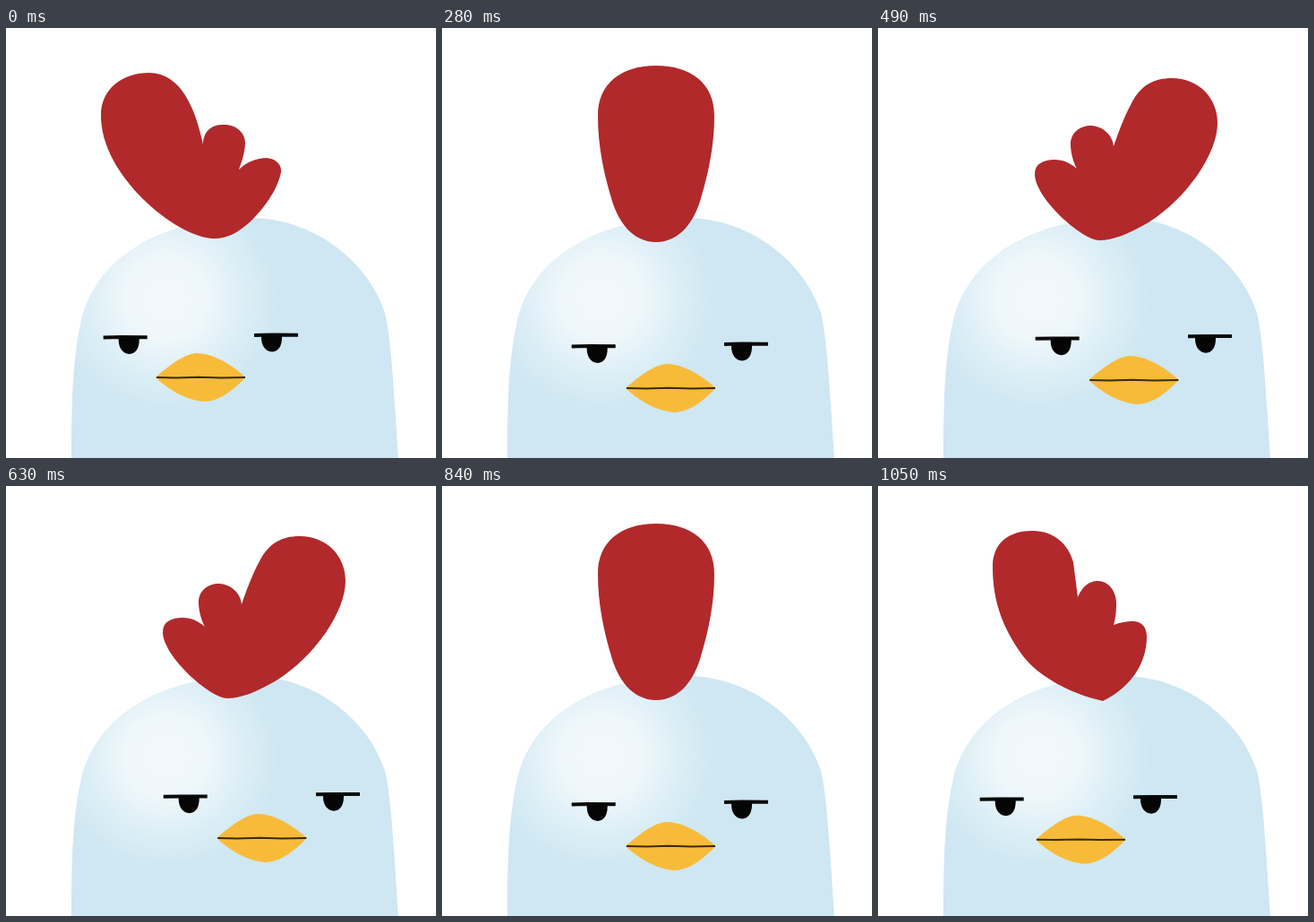
Write an HTML page that moves like this. It is 480 by 480 pixels and loops after 1120 ms.

```html
<!DOCTYPE html>
<html lang="en">
<head>
<meta charset="utf-8">
<title>Rooster</title>
<style>
  html, body { margin: 0; width: 100%; height: 100%; overflow: hidden; background: #fff; }
  svg { display: block; width: 100%; height: 100%; }
</style>
</head>
<body>
<svg viewBox="0 0 480 480">
  <defs>
    <radialGradient id="glow" gradientUnits="userSpaceOnUse" cx="178" cy="302" r="128">
      <stop offset="0" stop-color="#f2f9fc"/>
      <stop offset=".35" stop-color="#eff7fb"/>
      <stop offset=".7" stop-color="#dbeef6"/>
      <stop offset="1" stop-color="#cee7f2"/>
    </radialGradient>
    <path id="lid" d="M0 0.2 L20 -.2 L49 0" fill="none" stroke="#0b0b0b" stroke-width="4"/>
    <path id="pupil" d="M0 0 H23 V3 C23 12 19 18.6 12 18.6 C5 18.6 0 12 0 3Z" fill="#050505"/>
  </defs>
  <path fill="url(#glow)" d="M73 480 C73 410 75 368 83.500 329 C99 257 172 212 272 212 C345 212 405 262 423 318 C430 345 434 420 438 480Z"/>
  <path id="comb" fill="#b1292b"/>
  <g id="left"><use href="#lid"/><use href="#pupil" x="17"/></g>
  <g id="right"><use href="#lid"/><use href="#pupil" x="8"/></g>
  <g id="beak">
    <path fill="#f8bb39" d="M167 390 C180 378 200 363 213 363 C232 363 255 378 267.500 390 C255 403 238 417 222 417 C204 417 180 403 167 390Z"/>
    <path fill="none" stroke="#3a2b0c" stroke-width="2" d="M168 390 L190 390.4 L215 389.8 L240 390.4 L267 390"/>
  </g>
</svg>
<script>
  const STEP = 70;
  const LAST = 8;
  const MIRROR = 'matrix(-1 0 0 1 478 0)';

  // Comb outlines, from leaning left to upright
  const lean = [
    'M232 235 C190 234 105 164 106 97 C106 68 130 50 160 50 C196 50 212 92 220 130 C220 115 230 107 244 108 C258 108 267 118 267 128 C267 138 263 150 260 158 C268 150 280 145 291 145 C302 146 308 153 307 161 C303 182 286 203 274 215 C260 228 248 235 232 235Z',
    'M251 240 C215 232 180 213 162 190 C140 160 128 130 128 90 C128 62 148 50 172 50 C197 50 213 66 218 85 L223 124 C228 112 236 106 245 106 C258 106 266 118 266 131 C266 141 265 148 263 155 C272 152 278 151 284 151 C295 151 300 158 300 168 C300 200 280 226 251 240Z',
    'M239 239 C230 239 222 232 206 219 C170 190 139 145 139 95 C139 60 160 41 205 41 C228 41 247 68 247 95 C247 103 245 110 242 115 C250 108 257 106 264 106 C272 106 277 112 277 123 C277 137 274 148 268 156 C274 152 280 151 285 151 C294 152 299 162 299 173 C299 195 285 215 270 226 C255 235 246 239 239 239Z',
    'M249 239 C225 239 208 222 196 202 C178 170 156 130 156 94 C156 62 180 42 215 42 C250 42 267 68 268 104 C271 101 274 101 277 101 C285 102 289 111 289 121 C288 131 286 139 282 146 C286 145 289 145 292 145 C299 146 302 152 302 163 C302 205 285 239 249 239Z',
    'M239 239 C212 239 196 215 189 190 C180 160 174 130 174 98 C174 62 200 42 239 42 C278 42 304 62 304 98 C304 130 298 160 289 190 C282 215 266 239 239 239Z'
  ];
  const swept = 'M247 237 C228 237 175 190 175 163 C175 152 184 147 197 147 C207 147 215 151 222 157 C218 150 215 139 215 130 C215 117 225 109 238 109 C252 110 262 120 263 132 C268 118 275 98 283 84 C293 64 308 56 328 56 C358 56 379 78 379 106 C379 140 345 190 302 217 C280 230 262 237 247 237Z';

  const combs = [
    ...lean.map(d => [d, '']),
    [lean[3], MIRROR],
    [lean[2], MIRROR],
    [swept, ''],
    [swept, 'rotate(4 247 237)']
  ];

  // Shifts of the face parts as the head turns
  const beakX = [0, 9, 17, 28, 38, 48, 58.3, 68.3, 78];
  const beakY = [0, 4.7, 5.6, 6.3, 12, 7, 2, 3, 2];
  const leftX = [0, 5, 16, 27, 36, 46, 56, 67, 76];
  const rightX = [0, 8, 17, 27, 38, 48, 58, 69, 77];
  const eyeY = [0, 4.3, 5, 5, 10, 6, 2, 1.3, 0.5];

  const part = id => document.getElementById(id);
  const comb = part('comb'), left = part('left'), right = part('right'), beak = part('beak');
  const place = (el, x, y) => el.setAttribute('transform', `translate(${x} ${y})`);

  function draw() {
    const step = Math.floor(performance.now() / STEP) % (2 * LAST);
    const pose = LAST - Math.abs(LAST - step);
    const [outline, turn] = combs[pose];
    comb.setAttribute('d', outline);
    comb.setAttribute('transform', turn);
    place(left, 108.7 + leftX[pose], 345.3 + eyeY[pose]);
    place(right, 277 + rightX[pose], 342.8 + eyeY[pose]);
    place(beak, beakX[pose], beakY[pose]);
    requestAnimationFrame(draw);
  }
  draw();
</script>
</body>
</html>
```
